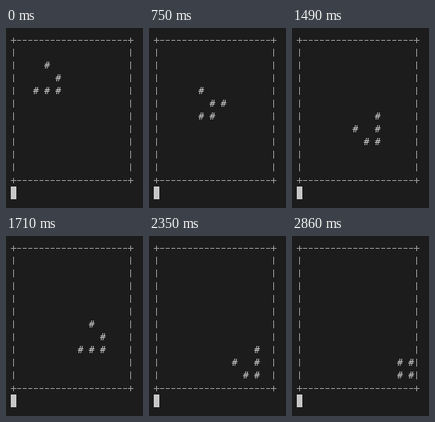
Animation of 172x226 px, one loop 3080 ms. Source, as an HTML page:

```html
<!DOCTYPE html>
<html lang="en">
<head>
<meta charset="utf-8">
<title>Glider</title>
<style>
  html, body { margin: 0; width: 100%; height: 100%; overflow: hidden; background: #1c1c1c; }
  svg { position: absolute; left: 0; top: 0; fill: none; stroke: #9c9c9c; }
  #cells {
    position: absolute; left: 13px; top: 23px; margin: 0;
    font: 12px/16px "DejaVu Sans Mono", monospace;
    letter-spacing: calc(7px - 1ch);
    color: #c7c7c7;
  }
  #cursor { position: absolute; left: 6px; top: 199px; width: 7px; height: 16px; background: #c7c7c7; }
</style>
</head>
<body>
<svg width="172" height="226" shape-rendering="crispEdges">
  <path stroke-dasharray="5 2" d="M14 15.5H153M14 191.5H153"/>
  <path stroke-dasharray="10 6" d="M9.5 26V183M156.5 26V183"/>
  <path d="M6 15.5h7M9.5 12v7M153 15.5h7M156.5 12v7M6 191.5h7M9.5 188v7M153 191.5h7M156.5 188v7"/>
</svg>
<pre id="cells"></pre>
<div id="cursor"></div>
<script>
const SIZE = 10;
const LOOP = 3080;
// How long each generation stays, in ms; the last one fills the rest of the loop.
const holds = [
  100, 110, 110, 110, 110, 110,
  100, 110, 100, 110, 100, 110,
  110, 100, 110, 110, 110,
  110, 110, 110, 100, 100,
  100, 100, 100, 100, 110
];
const glider = ["2,1", "3,2", "1,3", "2,3", "3,3"];

const range = [...Array(SIZE).keys()];
const board = document.getElementById("cells");

function neighbours(cells, x, y) {
  let count = 0;
  for (let dy = -1; dy <= 1; dy++)
    for (let dx = -1; dx <= 1; dx++)
      if ((dx || dy) && cells.has(`${x + dx},${y + dy}`)) count++;
  return count;
}

function evolve(cells) {
  const next = new Set();
  for (const y of range)
    for (const x of range) {
      const n = neighbours(cells, x, y);
      const key = `${x},${y}`;
      if (n === 3 || (n === 2 && cells.has(key))) next.add(key);
    }
  return next;
}

const render = cells => range.map(y =>
  range.map(x => cells.has(`${x},${y}`) ? " #" : "  ").join("")).join("\n");

const generations = [new Set(glider)];
for (const _ of holds) generations.push(evolve(generations.at(-1)));
const pictures = generations.map(render);

let shown = -1;
function draw() {
  let t = performance.now() % LOOP;
  let i = 0;
  while (i < holds.length && t >= holds[i]) t -= holds[i++];
  // A leading newline would be dropped by the parser only, so plain text is safe here.
  if (i !== shown) board.textContent = pictures[shown = i];
  requestAnimationFrame(draw);
}
draw();
</script>
</body>
</html>
```
